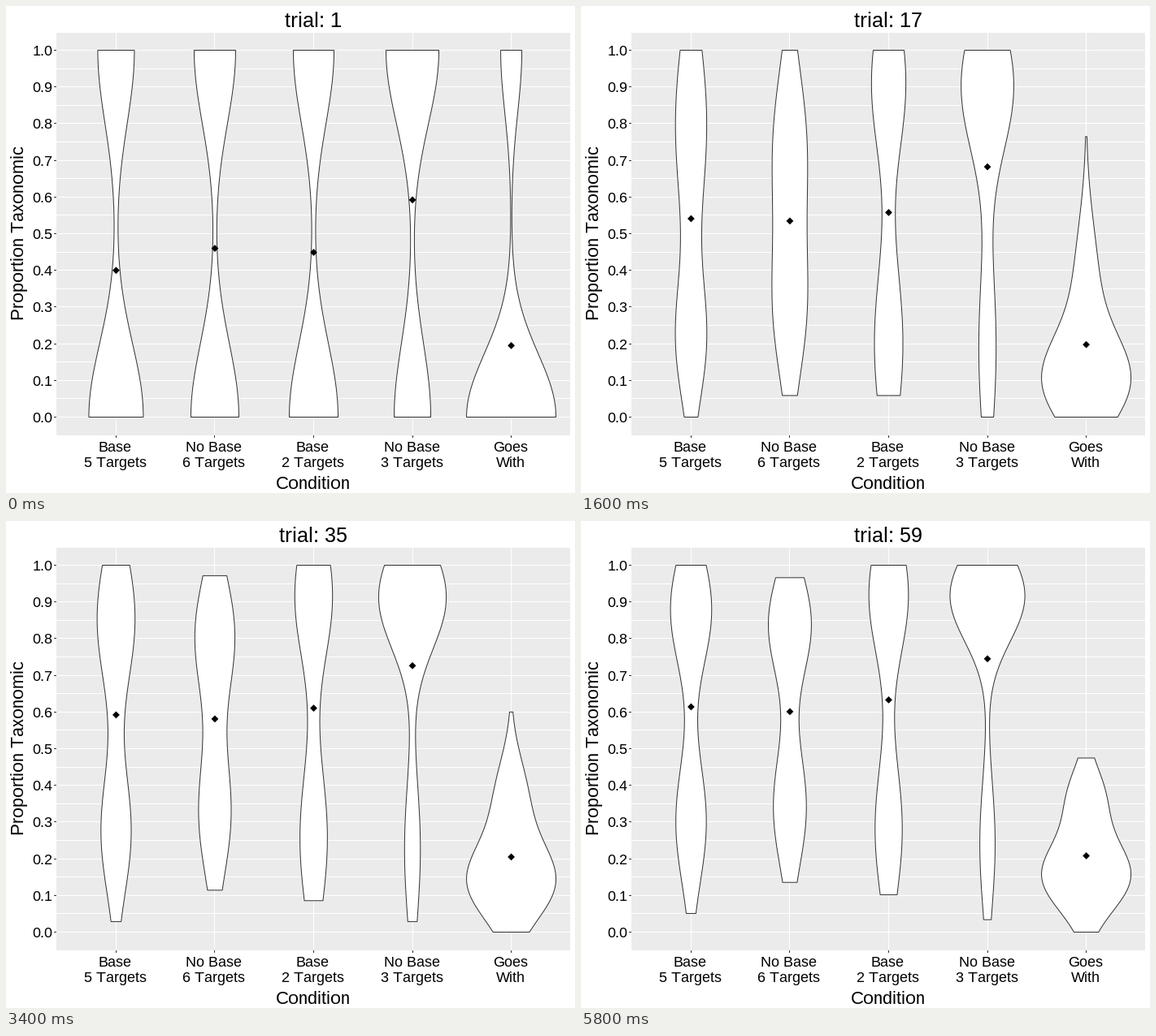
A matplotlib script that plays this animation: 700x600 px, repeating every 5.9 s.

```python
import numpy as np
import matplotlib.pyplot as plt
from matplotlib.animation import FuncAnimation
from matplotlib.patches import Polygon, Rectangle

W, H, DPI = 700, 600, 100
TRIALS, MID = 59, 12
LEFT, RIGHT, TOP, BOTTOM = 62, 694, 33, 529
WIDEST = 55                      # half-width of the widest violin
U = np.linspace(0, 1, 161)       # position along a violin
DARK = "#333333"

plt.rcParams.update({
    "font.family": "Liberation Sans",
    "text.hinting": "native",
    "text.hinting_factor": 1,
    "text.kerning_factor": 6,
})


def px(n):
    return n * 72 / DPI


def y_of(value):
    return 506.5 - 452 * value


def x_of(i):
    return LEFT + (RIGHT - LEFT) / 5.2 * (i + .6) + .5


def settle(n):
    """Pose position: 0 at trial 1, 1 at MID, easing out to 2 at the end."""
    if n <= MID:
        return np.log(n) / np.log(MID)
    return 1 + (1 - np.exp((MID - n) / 18)) / (1 - np.exp((MID - TRIALS) / 18))


def count(last, n):
    """Whole number of answers, growing to `last` at the final trial."""
    return round(last * ((n - 1) / (TRIALS - 1)) ** 1.5)


class Violin:
    """Two bell curves cut off at the lowest and highest score.

    Each pose is the mean, then height, centre and spread of both curves.
    """

    def __init__(self, label, poses, low=0, miss=0):
        self.label, self.low, self.miss = label, low, miss
        self.poses = np.array(poses)

    def state(self, n):
        s = settle(n)
        i = min(int(s), 1)
        mean, *bells = self.poses[i] + (s - i) * (self.poses[i + 1] - self.poses[i])
        lo, hi = count(self.low, n) / n, 1 - count(self.miss, n) / n
        score = lo + (hi - lo) * U
        half = sum(h * np.exp(-((score - c) / sd) ** 2 / 2)
                   for h, c, sd in (bells[:3], bells[3:]))
        return mean, score, half


violins = [
    Violin("Base\n5 Targets", [
        (.400, 33.5, 0, .2, 22.5, 1, .2),
        (.515, 19, .18, .17, 17.8, .77, .27),
        (.614, 18.5, .3, .165, 25, .88, .153)], low=3),
    Violin("No Base\n6 Targets", [
        (.460, 29.5, 0, .2, 25.5, 1, .2),
        (.511, 19.5, .27, .2, 19, .7, .24),
        (.601, 20, .34, .16, 26, .84, .14)], low=8, miss=2),
    Violin("Base\n2 Targets", [
        (.449, 30, 0, .2, 25, 1, .2),
        (.531, 18.5, .17, .23, 20.8, .91, .2),
        (.633, 16.5, .28, .183, 24, .92, .165)], low=6),
    Violin("No Base\n3 Targets", [
        (.592, 22.5, 0, .2, 32.5, 1, .2),
        (.660, 11.5, .17, .25, 28.8, .9, .2),
        (.745, 9.3, .24, .175, 45.5, .917, .125)], low=2),
    Violin("Goes\nWith", [
        (.195, 55, 0, .172, 13, 1, .172),
        (.194, 51.5, .075, .13, 12.5, .36, .2),
        (.208, 53.5, .153, .096, 21, .37, .085)], miss=31),
]

fig = plt.figure(figsize=(W / DPI, H / DPI), dpi=DPI, facecolor="white")
ax = fig.add_axes([0, 0, 1, 1])
ax.set_xlim(0, W)
ax.set_ylim(H, 0)
ax.axis("off")


def bar(x, y, w, h, color):
    ax.add_patch(Rectangle((x, y), w, h, fc=color, ec="none", zorder=1))


def label(x, y, text, size, ha="center", **kw):
    return ax.text(x, y, text, fontsize=px(size), ha=ha, va="baseline",
                   color="black", **kw)


def shape(**kw):
    return ax.add_patch(Polygon([(0, 0)] * 3, closed=True, snap=False, **kw))


# Panel, grid and axes
bar(LEFT, TOP, RIGHT - LEFT, BOTTOM - TOP, "#EBEBEB")
for k in range(21):
    y = int(y_of(k / 20))
    bar(LEFT, y, RIGHT - LEFT, 1, "white")
    if k % 2 == 0:
        bar(LEFT - 3, y, 3, 1, DARK)
        label(57.5, y + 7, f"{k / 20:.1f}", 18, ha="right")
for i, v in enumerate(violins):
    x = int(x_of(i))
    bar(x, TOP, 1, BOTTOM - TOP, "white")
    bar(x, BOTTOM, 1, 3, DARK)
    for row, words in enumerate(v.label.split("\n")):
        label(x_of(i) - 1, 549 + 19 * row, words, 18)
label(378, 595, "Condition", 22)
label(22, 280, "Proportion Taxonomic", 22, rotation=90, rotation_mode="anchor")
title = label(378, 26, "", 26)

bodies = [shape(fc="white", ec=DARK, lw=px(1), joinstyle="miter", zorder=3)
          for _ in violins]
dots = [shape(fc="black", ec="none", zorder=4) for _ in violins]


def draw(frame):
    n = frame + 1
    title.set_text(f"trial: {n}")
    states = [v.state(n) for v in violins]
    scale = WIDEST / max(half.max() for _, _, half in states)
    for i, (mean, score, half) in enumerate(states):
        x, y, w = x_of(i), y_of(score), half * scale
        bodies[i].set_xy(np.column_stack([np.r_[x - w, (x + w)[::-1]],
                                          np.r_[y, y[::-1]]]))
        m, r = y_of(mean), 4.4
        dots[i].set_xy([(x - r, m), (x, m - r), (x + r, m), (x, m + r)])
    return [title, *bodies, *dots]


anim = FuncAnimation(fig, draw, frames=TRIALS, interval=100,
                     repeat=True, repeat_delay=0, blit=False)
plt.show()
```
